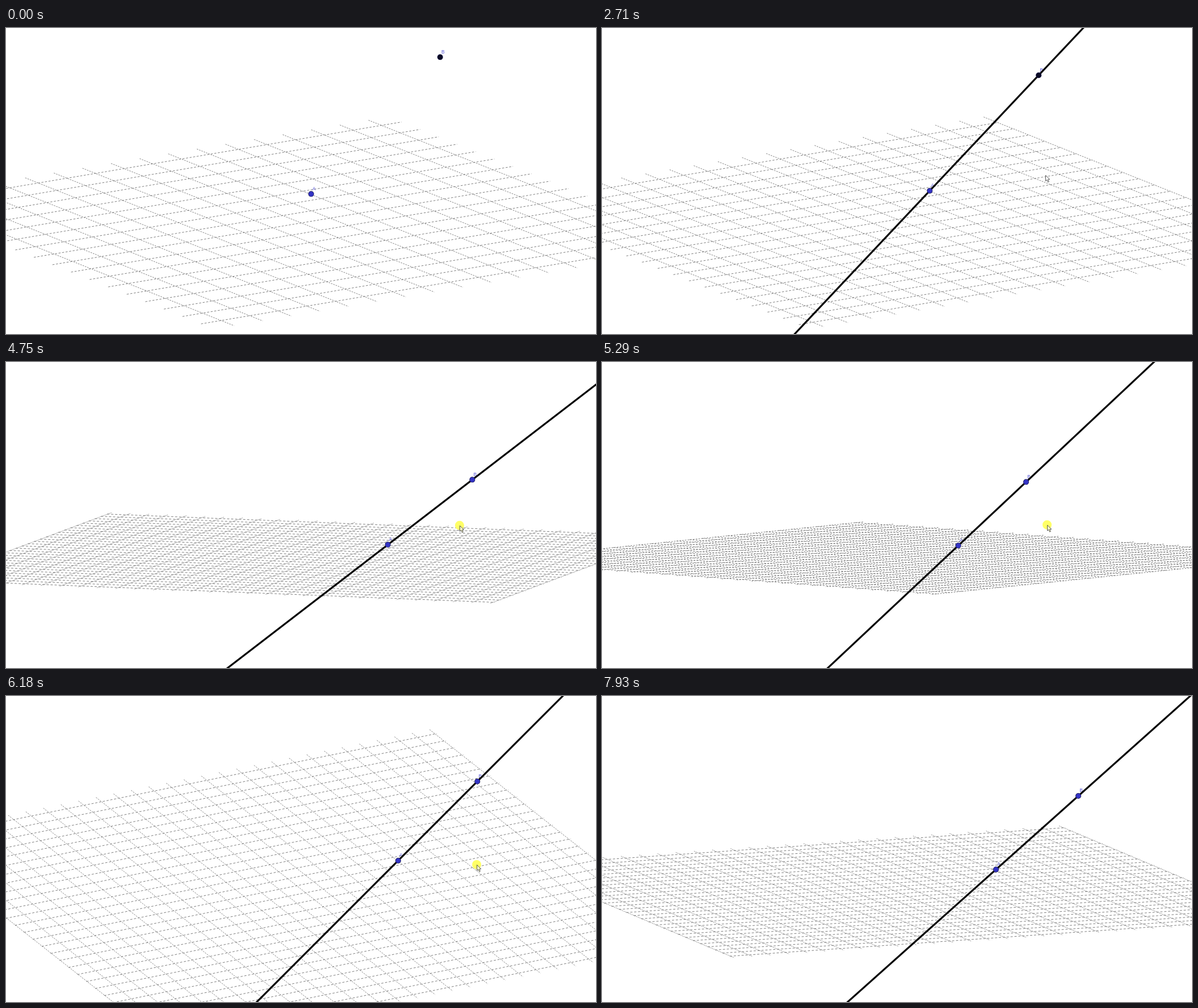
An HTML page with a canvas that plays this animation: 1038x539 px, repeating every 8 s.

```html
<!DOCTYPE html>
<html lang="en">
<head>
<meta charset="utf-8">
<title>Line through two points in space</title>
<style>
  html, body { margin: 0; width: 100%; height: 100%; overflow: hidden; background: #fff; }
  canvas { display: block; }
</style>
</head>
<body>
<canvas id="stage" width="1038" height="539"></canvas>
<script>
const ctx = document.getElementById('stage').getContext('2d');
const W = 1038, H = 539, LOOP = 8000;
const LINE_SHOWN = 500, CURSOR_SHOWN = 1690, PRESS = 4070, RELEASE = 7250;
const CENTER_X = 519.5, CENTER_Y = 269.5, DROP = 76.5, HALF = 522;
const ARROW = new Path2D('M0 0V10L2.4 8 4 12 5.8 11.2 4.2 7.4 7.2 7.2Z');

// Progress from 0 to 1 between two times
const ramp = (t, from, to) => Math.min(1, Math.max(0, (t - from) / (to - from)));
const ease = (t, from, to) => {
  const u = ramp(t, from, to);
  return u * u * (3 - 2 * u);
};

// Degrees of rotation while the view is dragged left, back right, then settled
const turnAt = t => 33 - 73.25 * ease(t, PRESS, 5144) + 67.2 * ease(t, 5290, 6180) - 4.9 * ease(t, 6180, 6920);
const tiltAt = t => 15 - 10 * ease(t, PRESS, 5024) + 18.6 * ease(t, 5290, 6180) - 13.75 * ease(t, 6180, 6920);

function makeView(t) {
  const zoom = ramp(t, 2440, 3050), nudge = ramp(t, 3250, 3830);
  const scale = 60 - 21 * zoom - 4.35 * nudge;
  const ox = 144.3 * zoom + 27.9 * nudge, oy = -46.8 * zoom + 65.8 * nudge;
  const turn = turnAt(t) * Math.PI / 180, tilt = tiltAt(t) * Math.PI / 180;
  const cos = Math.cos(turn), sin = Math.sin(turn);
  const flat = Math.sin(tilt), rise = Math.cos(tilt);
  // plane coordinates in pixels, measured from the middle of the view
  const project = (x, y, z = 0) => [
    CENTER_X + x * cos + y * sin,
    CENTER_Y + (y * cos - x * sin) * flat + (DROP - z) * rise
  ];
  return {
    scale, ox, oy, project,
    lengthX: Math.hypot(cos, sin * flat),
    lengthY: Math.hypot(sin, cos * flat),
    point: (x, y, z) => project(ox + x * scale, oy + y * scale, z * scale)
  };
}

function cursorAt(t) {
  const arrive = ramp(t, CURSOR_SHOWN, 2160), grab = ease(t, 3250, 3830);
  const leave = ramp(t, RELEASE, 7930);
  const x = 279 + 501 * arrive;
  const y = 391 - 132 * arrive - 268 * Math.sin(Math.PI * arrive);
  const dragX = 810 + 0.67 * turnAt(t), dragY = 284 + 0.55 * tiltAt(t);
  return [x + (dragX - x) * grab + 172 * leave, y + (dragY - y) * grab + 251 * leave];
}

function segment(from, to) {
  ctx.moveTo(...from);
  ctx.lineTo(...to);
}

function gridFamily(offset, step, length, ends) {
  ctx.setLineDash([4.2 * length, 3.2 * length]);
  ctx.beginPath();
  for (let i = Math.ceil((-HALF - offset) / step); offset + i * step <= HALF; i++) {
    segment(...ends(offset + i * step));
  }
  ctx.stroke();
}

function drawGrid({ scale, ox, oy, project, lengthX, lengthY }) {
  ctx.strokeStyle = '#6a6a6a';
  ctx.lineWidth = 0.85;
  gridFamily(oy, scale, lengthX, y => [project(-HALF, y), project(HALF, y)]);
  gridFamily(ox, scale, lengthY, x => [project(x, -HALF), project(x, HALF)]);
  ctx.setLineDash([]);
}

function drawLabel(text, [x, y]) {
  ctx.fillStyle = '#5a5ad8';
  ctx.fillText(text, x + 5, y - 9);
}

function drawLine([ax, ay], [bx, by]) {
  const dx = (bx - ax) * 10, dy = (by - ay) * 10;
  ctx.strokeStyle = '#000';
  ctx.lineWidth = 3.2;
  ctx.beginPath();
  segment([ax - dx, ay - dy], [ax + dx, ay + dy]);
  ctx.stroke();
}

function disc([x, y], radius, fill) {
  ctx.fillStyle = fill;
  ctx.beginPath();
  ctx.arc(x, y, radius, 0, Math.PI * 2);
  ctx.fill();
}

function drawPoint(at, fill) {
  disc(at, 5, '#16164a');
  disc(at, 4.3, fill);
}

function drawCursor(t) {
  const [x, y] = cursorAt(t), pressed = t >= PRESS && t < RELEASE;
  if (pressed) disc([x, y], 8, '#ffff66');
  ctx.save();
  ctx.translate(x + 0.5, y + 0.5);
  ctx.fillStyle = pressed ? '#ffffc8' : '#fff';
  ctx.fill(ARROW);
  ctx.strokeStyle = '#444';
  ctx.lineWidth = 0.9;
  ctx.stroke(ARROW);
  ctx.restore();
}

function draw(t) {
  const view = makeView(t);
  const a = view.point(0, 0.53, 1), b = view.point(4.51, 0.53, 4.5);
  ctx.fillStyle = '#fff';
  ctx.fillRect(0, 0, W, H);
  drawGrid(view);
  ctx.font = '8.5px "Liberation Sans", sans-serif';
  ctx.textAlign = 'center';
  ctx.textBaseline = 'middle';
  drawLabel('A', a);
  drawLabel('B', b);
  if (t >= LINE_SHOWN) drawLine(a, b);
  drawPoint(a, '#3434c4');
  drawPoint(b, t < PRESS ? '#0a0a24' : '#3434c4');
  if (t >= CURSOR_SHOWN) drawCursor(t);
}

const start = performance.now();
function tick() {
  draw((performance.now() - start) % LOOP);
  requestAnimationFrame(tick);
}
tick();
</script>
</body>
</html>
```
